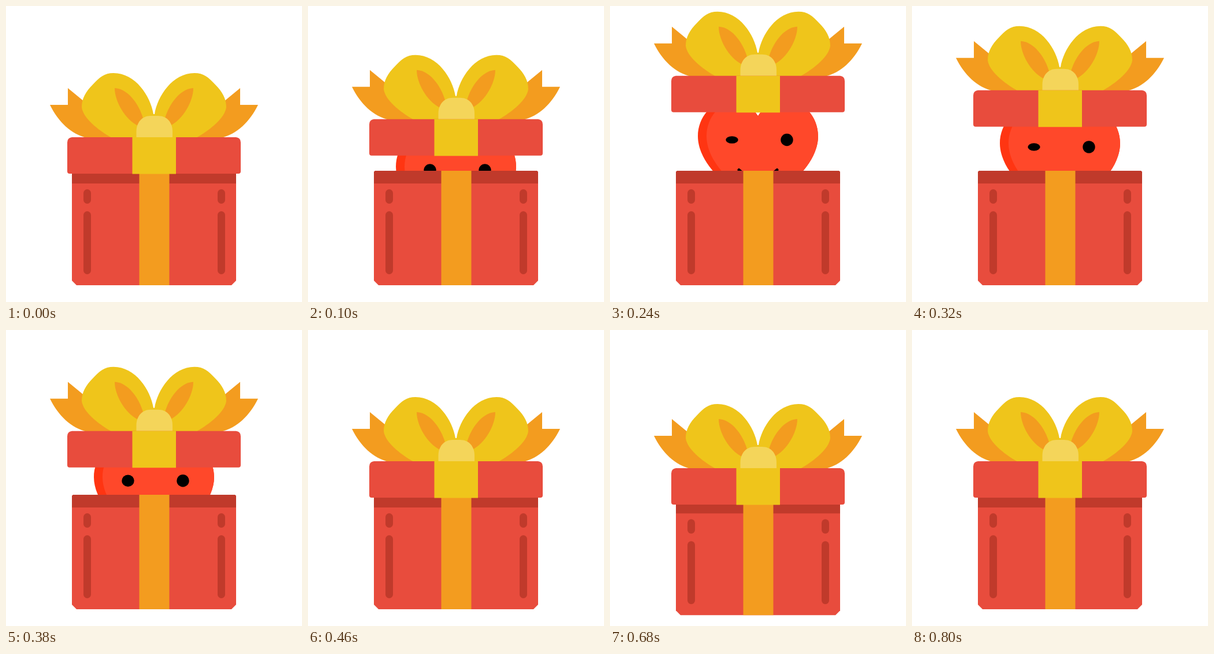
Write an HTML page that moves like this. It is 512 by 512 pixels and loops after 820 ms.

```html
<!DOCTYPE html>
<html lang="en">
<head>
<meta charset="utf-8">
<title>Gift box</title>
<style>
html, body { margin: 0; width: 100%; height: 100%; overflow: hidden; background: #fff; }
svg { display: block; width: 100vw; height: 100vh; }
</style>
</head>
<body>
<svg viewBox="0 0 512 512">
  <defs>
    <path id="shape" d="M0-41C10-58 28-68 48-68C79-68 104-40 104-6C104 30 70 80 0 105C-70 80-104 30-104-6C-104-40-79-68-48-68C-28-68-10-58 0-41Z"/>
    <clipPath id="inside"><use href="#shape"/></clipPath>
    <g id="loop">
      <path fill="#f39c1f" d="M107 142L135 165L186 228H140C113 222 90 200 76 171H107Z"/>
      <path fill="#efc51b" d="M255 187C250 156 224 116 186 116C170 116 162 123 150 136C138 148 131 160 131 175C133 193 158 214 183 228H256V187Z"/>
      <path fill="#f39c1f" d="M188 142C211 143 230 170 237 194L228 207C206 196 188 165 188 142Z"/>
    </g>
    <g id="grooves" fill="#c03a2b">
      <rect x="134" y="317" width="13" height="25" rx="6.5"/>
      <rect x="134" y="355" width="13" height="109" rx="6.5"/>
    </g>
  </defs>

  <g id="heart">
    <use href="#shape" fill="#ff3512"/>
    <g clip-path="url(#inside)"><use href="#shape" x="15" fill="#ff482a"/><path fill="#ff482a" d="M-20-41H20V-75H-20Z"/></g>
    <ellipse id="eye" cx="-45" rx="10.7" ry="10.7"/>
    <circle cx="50" r="10.7"/>
    <path d="M-33 52Q0 84 33 52" fill="none" stroke="#000" stroke-width="5" stroke-linecap="round"/>
  </g>

  <g id="box">
    <path fill="#e84c3d" d="M116 285H396L398 287V475L390 483H122L114 475V287Z"/>
    <path fill="#c03a2b" d="M116 285H396L398 287V307H114V287Z"/>
    <rect x="230.5" y="285" width="52" height="198" fill="#f39c1f"/>
    <use href="#grooves"/>
    <use href="#grooves" x="232"/>
  </g>

  <g id="lid">
    <use href="#loop"/>
    <use href="#loop" transform="matrix(-1 0 0 1 512 0)"/>
    <path fill="#f4d55a" d="M225.5 228V217C225.5 201 236 190 250 190H263C278 190 288 201 288 217V228Z"/>
    <path fill="#e84c3d" d="M114 227H398Q406 228 406 236V286Q406 290 402 290H110Q106 290 106 286V236Q106 228 114 227Z"/>
    <rect x="218.5" y="227" width="75.5" height="63.5" fill="#efc51b"/>
  </g>
</svg>
<script>
const LOOP = 820, STEP = 20, OPEN = 40, SHUT = 460;
const [heart, eye, box, lid] = ["heart", "eye", "box", "lid"].map(id => document.getElementById(id));
const part = (t, a, b) => Math.min(1, Math.max(0, (t - a) / (b - a)));
const ease = p => (1 - Math.cos(Math.PI * p)) / 2;
const shift = (el, x, y) => el.setAttribute("transform", `translate(${x} ${y.toFixed(2)})`);

// Rise to the peak, then fall like a dropped weight.
function hop(t, peak, power) {
  return t < peak ? part(t, OPEN, peak) ** power : 1 - part(t, peak, SHUT) ** 2;
}

function draw(t) {
  const dip = ease(part(t, 500, 640)) - ease(part(t, 640, 800));
  shift(lid, 0, 14 * dip - 115.6 * hop(t, 152, 2.1));
  shift(box, 0, 12 * dip);
  shift(heart, 256, 293.6 - 64 * hop(t, 195, 2));
  heart.style.display = t > OPEN && t < SHUT ? "" : "none";
  const wink = Math.exp(-(((t - 278) / 65) ** 2));
  eye.setAttribute("ry", (10.7 - 6.2 * wink).toFixed(2));
}

function tick() {
  const t = performance.now() % LOOP;
  draw(Math.floor(t / STEP) * STEP);
  requestAnimationFrame(tick);
}
tick();
</script>
</body>
</html>
```
